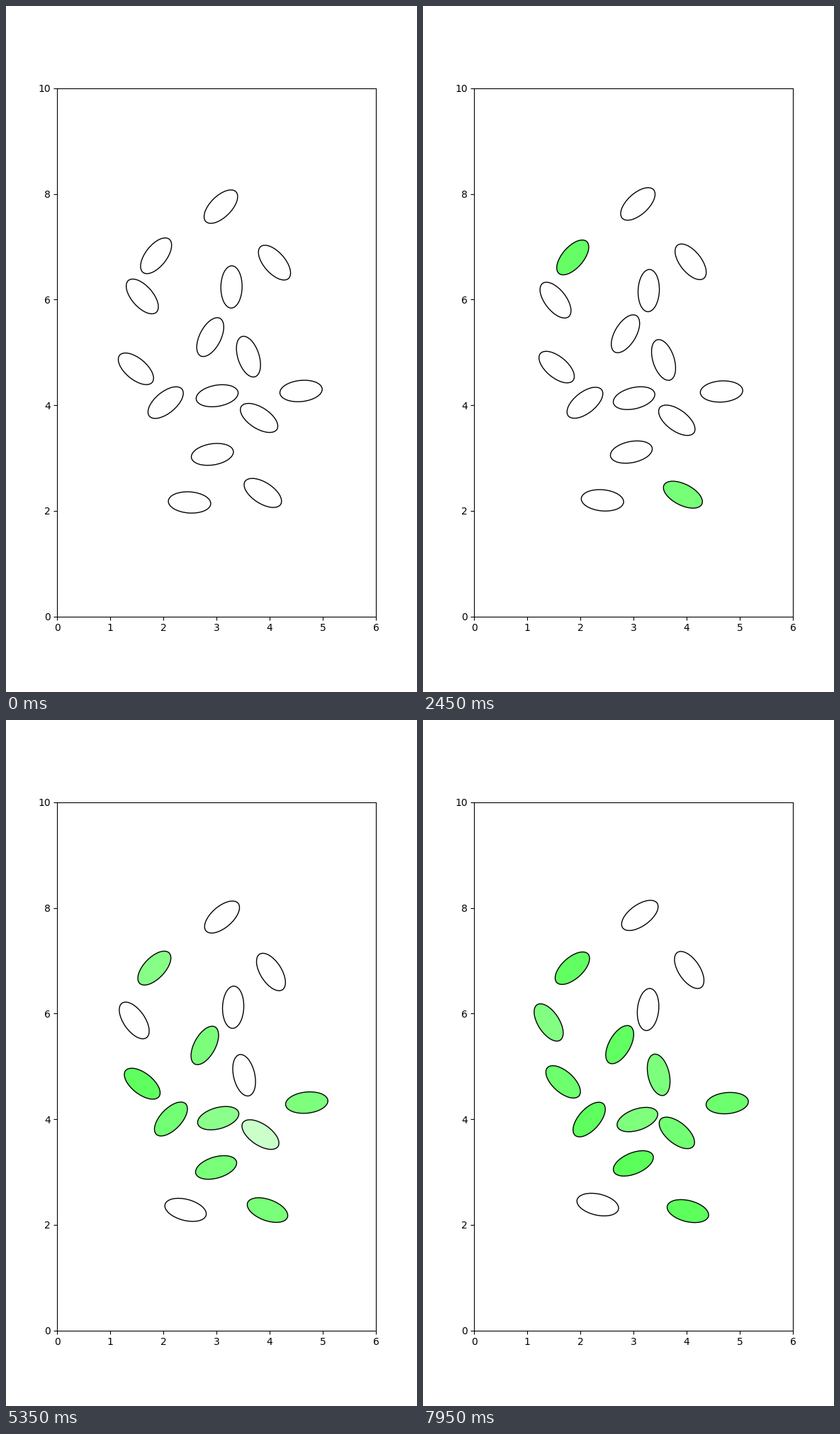
Recreate the animation shown at these times as a matplotlib script. Size 580 by 966 pixels, loop 8 s.

```python
import numpy as np
import matplotlib.pyplot as plt
from matplotlib.animation import FuncAnimation
from matplotlib.patches import Ellipse

W, H, DPI = 580, 966, 100
FRAMES, STEP = 160, 50
NEVER = 9.0
RAMP = 0.6  # seconds from white to full glow

# x, y, tilt at the start; their drift over the loop; second the cell lights up
CELLS = [
    (3.08, 7.76, 45, 0.05, 0.11, -5, NEVER),
    (1.86, 6.83, 52, 0.01, 0.02, -9, 1.7),
    (4.09, 6.70, -49, -0.05, 0.10, -7, NEVER),
    (1.60, 6.06, -49, -0.20, -0.26, -9, 7.3),
    (3.28, 6.24, 89, 0.00, -0.19, -3, NEVER),
    (2.88, 5.29, 63, -0.13, 0.13, -3, 2.8),
    (3.60, 4.92, -72, -0.12, -0.11, -2, 7.5),
    (1.48, 4.69, -40, 0.20, 0.00, -2, 3.5),
    (2.04, 4.05, 40, 0.14, -0.05, 7, 4.4),
    (3.01, 4.18, 10, 0.06, -0.20, 10, 3.5),
    (4.59, 4.27, 6, 0.18, 0.05, 0, 2.8),
    (3.80, 3.76, -33, 0.02, 0.00, -5, 5.1),
    (2.92, 3.07, 9, 0.09, 0.06, 8, 2.8),
    (2.49, 2.16, -4, -0.15, 0.20, -8, NEVER),
    (3.87, 2.34, -33, 0.17, -0.09, 18, 1.9),
]

rng = np.random.default_rng(7)
seconds = np.arange(FRAMES) * STEP / 1000


def jitter(size):
    """Random walk from zero that is pulled gently back."""
    path = np.zeros(FRAMES)
    for n in range(1, FRAMES):
        path[n] = 0.9 * path[n - 1] + rng.normal(0, size)
    return path


def wander(start, drift, size):
    return start + drift * np.linspace(0, 1, FRAMES) + jitter(size)


def glow(onset):
    """Strength of the green fill in each frame."""
    rise = np.clip((seconds - onset) / RAMP, 0, 1)
    return rise * np.clip(0.54 + jitter(0.03), 0.4, 0.7)


fig, ax = plt.subplots(figsize=(W / DPI, H / DPI), dpi=DPI)
fig.subplots_adjust(left=0.1249)
ax.set_xlim(0, 6)
ax.set_ylim(0, 10)
ax.set_xticks(range(7))
ax.set_yticks(range(0, 11, 2))

cells = []
for x, y, tilt, dx, dy, turn, onset in CELLS:
    patch = ax.add_patch(Ellipse((x, y), 0.8, 0.4, ec="black", lw=1))
    cells.append((
        patch,
        wander(x, dx, 0.008),
        wander(y, dy, 0.008),
        wander(tilt, turn, 0.8),
        1 - glow(onset),
    ))


def draw(n):
    for patch, x, y, tilt, level in cells:
        patch.set_center((x[n], y[n]))
        patch.set_angle(tilt[n])
        patch.set_facecolor((level[n], 1, level[n]))
    return [cell[0] for cell in cells]


anim = FuncAnimation(fig, draw, frames=FRAMES, interval=STEP,
                     repeat=True, repeat_delay=0)
plt.show()
```
